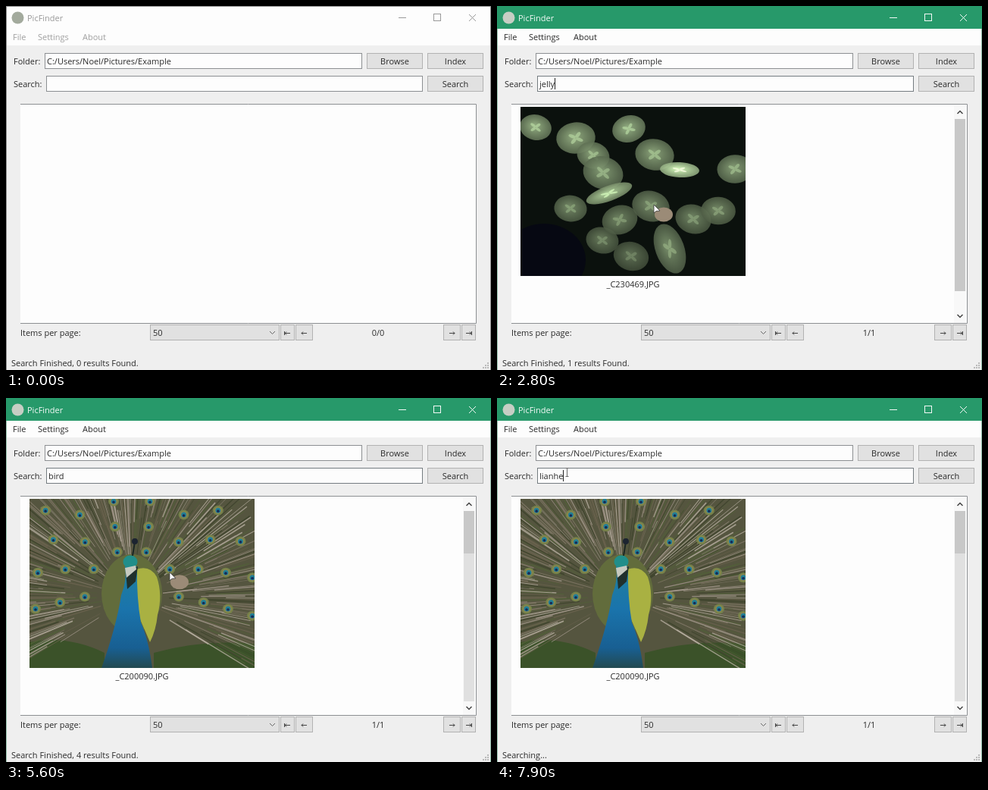
Recreate the animation shown at these times as an HTML page with a canvas. Size 640 by 480 pixels, loop 8 s.

```html
<!DOCTYPE html>
<html lang="en">
<head>
<meta charset="utf-8">
<title>PicFinder</title>
<style>
html, body { margin: 0; width: 100%; height: 100%; overflow: hidden; background: #efefef; }
canvas { display: block; width: 640px; height: 480px; }
</style>
</head>
<body>
<canvas id="stage" width="640" height="480"></canvas>
<script>
const LOOP = 8000;
const FONT = '11px "Open Sans", "Noto Sans", sans-serif';
const GREEN = '#27996a';
const INK = '#2a2a2a';
const EDGE = '#8c8f92';
const WAKE = 700;
const ctx = document.getElementById('stage').getContext('2d');
const PHOTO = { x: 31, y: 133, w: 297, h: 223 };

// Each search: typing starts at `at`, one key per `step`, then Enter, then the results
const SEARCHES = [
  { text: 'jelly', at: 1100, step: 150, enter: 2100, done: 2400, found: 1 },
  { text: 'bird', at: 4500, step: 100, enter: 4900, done: 5200, found: 4 },
  { text: 'lianhe', at: 6800, step: 140, enter: 7800, done: Infinity }
];
// Pointer moves: begin, end, x, y
const MOVES = [
  [700, 1000, 271, 103], [2450, 2750, 207, 262], [3200, 3600, 98, 103],
  [3750, 4150, 14, 94], [4900, 5300, 221, 235], [5550, 6000, 79, 88], [6000, 6200, 92, 98]
];

const clamp = (v, lo, hi) => Math.min(hi, Math.max(lo, v));

function seeded(seed) {
  return () => (seed = (seed * 16807) % 2147483647) / 2147483647;
}

function ellipse(c, x, y, rx, ry, rot, fill) {
  c.beginPath();
  c.ellipse(x, y, rx, ry, rot, 0, 7);
  c.fillStyle = fill;
  c.fill();
}

function shape(c, path, fill) {
  c.fillStyle = fill;
  c.fill(new Path2D(path));
}

function photo(paint) {
  const cv = document.createElement('canvas');
  cv.width = PHOTO.w;
  cv.height = PHOTO.h;
  const c = cv.getContext('2d');
  c.translate(-PHOTO.x, -PHOTO.y);
  paint(c);
  return cv;
}

function bell(c, x, y, rx, ry, rot, v) {
  const tint = (k, a) => `rgba(${170 * k | 0},${200 * k | 0},${150 * k | 0},${a})`;
  c.save();
  c.translate(x, y);
  c.rotate(rot);
  c.scale(rx, ry);
  const g = c.createRadialGradient(-.1, -.1, .1, 0, 0, 1);
  g.addColorStop(0, tint(v * 1.1, .95));
  g.addColorStop(1, tint(v * .75, .85));
  ellipse(c, 0, 0, 1, 1, 0, g);
  for (let a = .6; a < 6; a += Math.PI / 2) {
    ellipse(c, Math.cos(a) * .22, Math.sin(a) * .22, .2, .1, a, tint(v * 1.35, .7));
  }
  c.restore();
}

const jellies = photo(c => {
  const rnd = seeded(9);
  c.fillStyle = '#0b110d';
  c.fillRect(31, 133, 297, 223);
  ellipse(c, 62, 335, 55, 48, 0, '#060812');
  const centres = [
    [51, 160], [174, 162], [104, 174], [127, 197], [208, 196], [140, 220], [314, 215],
    [97, 267], [139, 309], [177, 330], [162, 282], [203, 264], [259, 281], [292, 270]
  ];
  for (const [x, y] of centres) {
    const r = 21 + rnd() * 6;
    bell(c, x, y, r, r * .8, .3 * Math.sin(x), .85 - (y - 133) / 600);
  }
  bell(c, 228, 320, 19, 34, -.35, .65);
  bell(c, 148, 247, 32, 10, -.35, .95);
  bell(c, 241, 216, 26, 10, .05, 1.15);
});

const peacock = photo(c => {
  const rnd = seeded(77);
  const hub = { x: 166, y: 262 };
  const at = (a, r) => [hub.x + Math.cos(a) * r, hub.y + Math.sin(a) * r];
  c.fillStyle = '#55553f';
  c.fillRect(31, 133, 297, 223);
  shape(c, 'M31 322 Q80 312 130 336 L130 356 L31 356Z M195 336 Q260 318 328 324 L328 356 L195 356Z', '#3b5229');

  const tones = ['#a89c90', '#877c6c', '#3a4029', '#526038', '#bdb3a6', '#6e6450'];
  c.globalAlpha = .75;
  for (let i = 0; i < 320; i++) {
    const a = Math.PI * (.82 + 1.36 * (i + rnd()) / 320);
    const r = 40 + rnd() * 90;
    c.beginPath();
    c.moveTo(...at(a, r));
    c.lineTo(...at(a, r + 40 + rnd() * 110));
    c.lineWidth = .6 + rnd() * 1.2;
    c.strokeStyle = tones[rnd() * tones.length | 0];
    c.stroke();
  }
  c.globalAlpha = 1;
  ellipse(c, hub.x, 258, 40, 52, 0, '#626c3c');

  // Feather eyes on widening arcs around the body
  for (let ring = 0; ring < 4; ring++) {
    const n = 6 + ring * 2;
    for (let i = 0; i < n; i++) {
      const [x, y] = at(Math.PI * (.9 + 1.2 * (i + .5) / n), 62 + ring * 33);
      ellipse(c, x, y, 7, 6.5, 0, '#75824a');
      ellipse(c, x, y, 5, 4.5, 0, '#94864c');
      ellipse(c, x, y, 3.5, 3.5, 0, '#237f94');
      ellipse(c, x, y + 1, 1.8, 1.8, 0, '#142a58');
    }
  }

  shape(c, 'M172 226 Q190 220 199 236 Q207 260 200 286 Q198 306 190 322 L174 285Z', '#a9b142');
  const g = c.createLinearGradient(0, 225, 0, 356);
  g.addColorStop(0, '#1f7f9e');
  g.addColorStop(.4, '#1a74ac');
  g.addColorStop(.8, '#185f92');
  g.addColorStop(1, '#234a50');
  shape(c, 'M157 222 Q160 240 152 260 Q146 300 126 356 L193 356 Q188 318 178 296 Q172 262 173 222Z', g);
  shape(c, 'M158 228 L174 222 L171 242 L160 252Z', '#20302c');
  ellipse(c, 164, 216, 9.5, 8.5, 0, '#218e8a');
  shape(c, 'M157 224 L171 221 L172 226 L159 237Z', '#c6cac0');
  shape(c, 'M166 208 L169 190 L171 190 L168 208Z', '#1c2724');
  ellipse(c, 170, 189, 4, 4, 0, '#1c2430');
});

function rect(x, y, w, h, fill) {
  ctx.fillStyle = fill;
  ctx.fillRect(x, y, w, h);
}

function box(x, y, w, h, fill, edge) {
  rect(x, y, w, h, fill);
  ctx.strokeStyle = edge;
  ctx.lineWidth = 1;
  ctx.strokeRect(x + .5, y + .5, w - 1, h - 1);
}

function line(points, color, width = 1) {
  ctx.strokeStyle = color;
  ctx.lineWidth = width;
  ctx.stroke(new Path2D('M' + points));
}

function text(s, x, y, color = INK, align = 'left') {
  ctx.textAlign = align;
  ctx.fillStyle = color;
  ctx.fillText(s, x, y);
}

function button(x, y, w, label) {
  box(x, y, w, 21, '#e1e1e1', '#b2b2b2');
  if (label) text(label, x + w / 2, y + 15, INK, 'center');
}

function arrowButton(x, w, dir, bar) {
  button(x, 420, w);
  const cx = x + w / 2;
  line(`${cx - 3.5 * dir} 431.5 L${cx + 3.5 * dir} 431.5`, '#444');
  line(`${cx + 1.5 * dir} 429.5 L${cx + 3.5 * dir} 431.5 L${cx + 1.5 * dir} 433.5`, '#444');
  if (bar) line(`${cx + 4 * dir} 429 L${cx + 4 * dir} 434`, '#444');
}

function typedAt(t) {
  let value = '', last = WAKE;
  for (const { text: word, at, step } of SEARCHES) {
    const n = clamp(Math.floor((t - at) / step) + 1, 0, word.length);
    if (n) {
      value = word.slice(0, n);
      last = at + (n - 1) * step;
    }
  }
  return { value, last };
}

function foundAt(t) {
  return SEARCHES.reduce((n, s) => t >= s.done ? s.found : n, 0);
}

function pointerAt(t) {
  let x = 300, y = 190;
  for (const [begin, end, tx, ty] of MOVES) {
    const p = clamp((t - begin) / (end - begin), 0, 1);
    const e = p * p * (3 - 2 * p);
    x += (tx - x) * e;
    y += (ty - y) * e;
  }
  return { x, y };
}

function drawFrame(active) {
  rect(0, 0, 640, 480, '#efefef');
  rect(0, 0, 640, 52, '#fdfdfd');
  const side = active ? '#8fbca8' : '#8a8a8a';
  rect(0, 0, 1, 480, side);
  rect(639, 0, 1, 480, side);
  rect(0, 0, 640, active ? 30 : 1, active ? GREEN : side);
  ellipse(ctx, 15.5, 15.5, 8, 8, 0, active ? '#c6cec4' : '#a3aa9d');
  const fg = active ? '#f4faf7' : '#999';
  text('PicFinder', 28, 20, fg);
  line('518 15.5 L528 15.5', fg);
  ctx.strokeRect(564.5, 10.5, 9, 9);
  line('611 11 L620 20 M620 11 L611 20', fg);
  const menu = active ? INK : '#a0a0a0';
  text('File', 9, 45, menu);
  text('Settings', 42, 45, menu);
  text('About', 101, 45, menu);
  for (let r = 0; r < 3; r++) {
    for (let k = 0; k <= r; k++) rect(635 - k * 3, 470 + r * 3, 2, 2, '#b9b9b9');
  }
}

function drawSearch(t, active, pointer) {
  box(53, 92, 497, 21, '#fdfdfd', EDGE);
  if (active) {
    ctx.setLineDash([1, 1]);
    line('53.5 92.5 H549.5 V112.5 H53.5 Z', '#5c686e');
    ctx.setLineDash([]);
  }
  const { value, last } = typedAt(t);
  const end = 56 + ctx.measureText(value).width;
  text(value, 56, 107);
  const dragging = t >= 3750 && t < 4500;
  const picked = t >= 6350 && t < 6800;
  const from = dragging ? Math.max(56, pointer.x) : 56;
  if ((dragging || picked) && from < end) {
    ctx.save();
    ctx.beginPath();
    ctx.rect(from, 95, end - from + .5, 15);
    ctx.clip();
    rect(56, 95, end - 55, 15, '#0b74ad');
    text(value, 56, 107, '#fff');
    ctx.restore();
  } else if (active && (t - last) % 1060 < 530) {
    rect(Math.round(end), 95, 1, 15, '#222');
  }
}

function drawResults(t) {
  rect(19, 129, 602, 290, '#fdfdfd');
  line('19 129.5 H620.5 V418.5 H19', EDGE);
  const found = foundAt(t);
  if (!found) return;
  const birds = found > 1;
  ctx.drawImage(birds ? peacock : jellies, PHOTO.x, PHOTO.y);
  text(birds ? '_C200090.JPG' : '_C230469.JPG', 179.5, 370.5, INK, 'center');
  rect(603, 131, 16, 287, '#f8f8f8');
  const long = t < 5500;
  if (!long) rect(604, 149, 14, 251, '#e0e0e0');
  rect(604, 149, 14, long ? 227 : 56, '#c8c8c8');
  line('607.5 142 L611 138.5 L614.5 142', '#444', 1.5);
  line('607.5 407 L611 410.5 L614.5 407', '#444', 1.5);
}

function drawFooter(t) {
  text('Items per page:', 19, 435);
  button(190, 420, 171);
  text('50', 194, 435);
  line('348 429 L351.5 432.5 L355 429', '#666');
  arrowButton(362, 19, -1, true);
  arrowButton(382, 23, -1);
  arrowButton(577, 23, 1);
  arrowButton(601, 19, 1, true);
  const found = foundAt(t);
  text(found ? '1/1' : '0/0', 491, 435, INK, 'center');
  const busy = SEARCHES.some(s => t >= s.enter && t < s.done);
  text(busy ? 'Searching...' : `Search Finished, ${found} results Found.`, 7, 475);
}

function drawPointer({ x, y }) {
  if (x > 53 && x < 550 && y > 92 && y < 113) {
    const px = Math.round(x) + .5, py = Math.round(y);
    line(`${px} ${py - 5} v10 M${px - 2} ${py - 5.5} h4 M${px - 2} ${py + 5.5} h4`, '#6a6a6a');
    return;
  }
  ctx.save();
  ctx.translate(x, y);
  ellipse(ctx, 13, 13, 12, 9.5, 0, '#9b8b77');
  const tip = '0 0 L0 11 L3 8.5 L8 8Z';
  shape(ctx, 'M' + tip, '#fff');
  line(tip, '#333', .8);
  ctx.restore();
}

function render(t) {
  const active = t >= WAKE;
  const pointer = pointerAt(t);
  ctx.font = FONT;
  drawFrame(active);
  text('Folder:', 10, 77);
  box(51, 62, 419, 21, '#fdfdfd', EDGE);
  text('C:/Users/Noel/Pictures/Example', 54, 77);
  button(476, 62, 74, 'Browse');
  button(556, 62, 74, 'Index');
  text('Search:', 10, 107);
  button(556, 92, 74, 'Search');
  drawSearch(t, active, pointer);
  drawResults(t);
  drawFooter(t);
  if (active) drawPointer(pointer);
}

const start = performance.now();
function tick() {
  render((performance.now() - start) % LOOP);
  requestAnimationFrame(tick);
}
tick();
</script>
</body>
</html>
```
